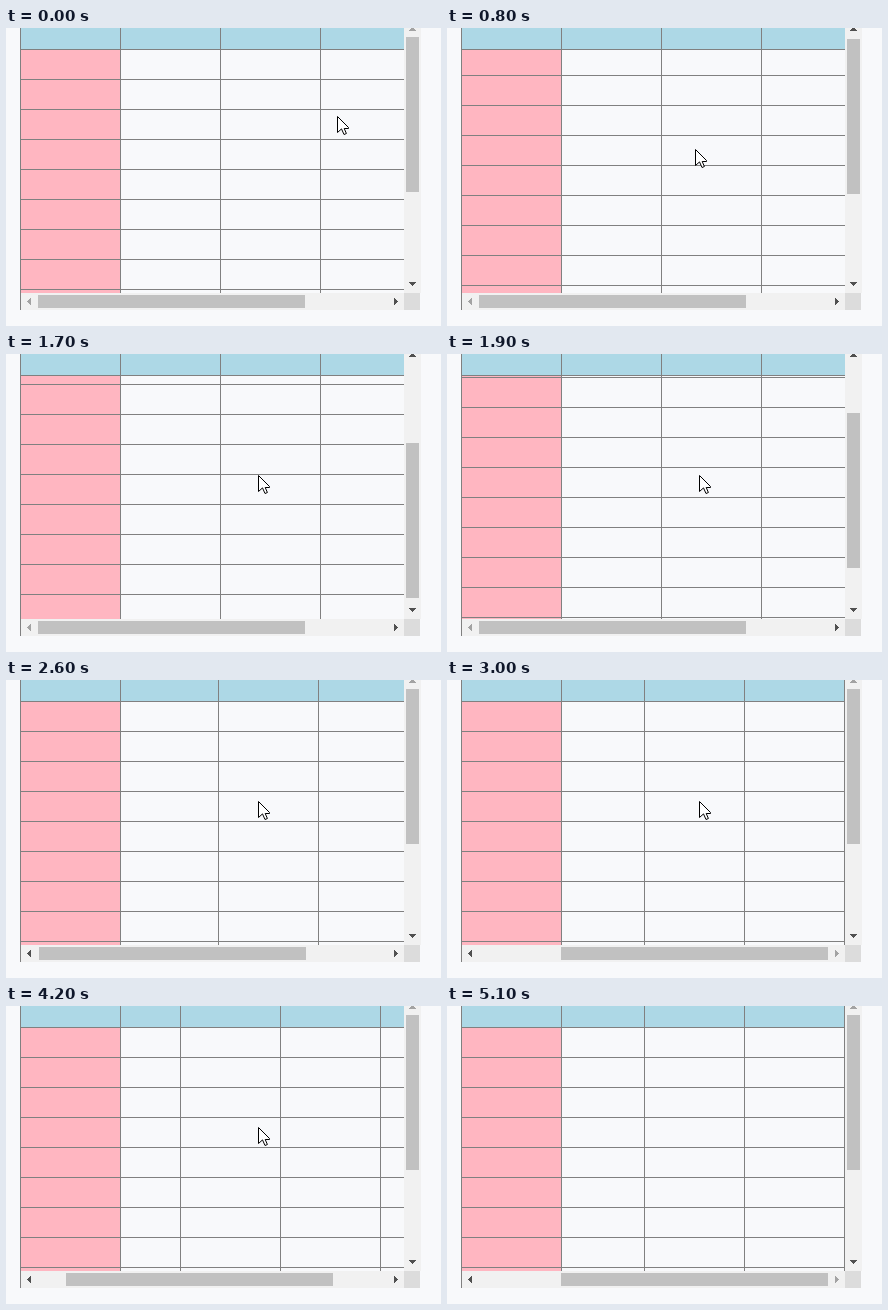
Recreate the animation shown at these times as an HTML page with a canvas. Size 435x298 px, loop 5500 ms.

```html
<!DOCTYPE html>
<html lang="en">
<head>
<meta charset="utf-8">
<title>Table with sticky header and column</title>
<style>
  html, body { margin: 0; width: 100%; height: 100%; overflow: hidden; background: #f8f9fb; }
  canvas { display: block; }
</style>
</head>
<body>
<canvas id="stage" width="435" height="298"></canvas>
<script>
const ctx = document.getElementById('stage').getContext('2d');
const LOOP = 5500, STEP = 100, MAX_X = 117, MAX_Y = 148;
const LINE = '#808080', TRACK = '#f1f1f1', THUMB = '#c1c1c1';

// Scroll gestures: each one accelerates from the previous position to `to`.
const verticalMoves = [
  { start: 700, end: 1000, to: 57 },
  { start: 1300, end: 1700, to: 141 },
  { start: 1700, end: 2000, to: 0 },
];
const horizontalMoves = [
  { start: 2500, end: 3000, to: MAX_X },
  { start: 3200, end: 3400, to: 76 },
  { start: 3700, end: 4000, to: 0 },
  { start: 4000, end: 4200, to: 40 },
  { start: 4400, end: 4600, to: MAX_X },
];
const pointerStops = [
  { at: 0, x: 331, y: 88 },
  { at: 100, x: 248, y: 121 },
  { at: 1400, x: 252, y: 121 },
  { at: 5000, x: 312, y: 96 },
];
const POINTER_GONE = 5100;

const arrowCursor = new Path2D(
  'M.5 .5V16.5L4.5 12.9L7 18.5L9.4 17.5L7.2 12.5H11.5V11.5Z');

const accelerate = p => p ** 2.4;

function scrollAt(moves, time) {
  let position = 0;
  for (const { start, end, to } of moves) {
    const progress = Math.min(1, Math.max(0, (time - start) / (end - start)));
    position += (to - position) * accelerate(progress);
  }
  return Math.round(position);
}

function rect(x, y, w, h, color) {
  ctx.fillStyle = color;
  ctx.fillRect(x, y, w, h);
}

// Arrowhead of four one-pixel rows, widening from its tip along (dx, dy).
function arrowhead(x, y, dx, dy, enabled) {
  const color = enabled ? '#505050' : '#a3a3a3';
  for (let i = 0; i < 4; i++) {
    const size = 2 * i + 1;
    if (dx) rect(x + dx * i, y - i, 1, size, color);
    else rect(x - i, y + dy * i, size, 1, color);
  }
}

function drawTable(sx, sy) {
  ctx.save();
  ctx.beginPath();
  ctx.rect(14, 0, 384, 265);
  ctx.clip();
  rect(15, 0, 99, 265, '#ffb6c1');
  for (let y = 21 - sy; y < 265; y += 30) rect(14, y, 384, 1, LINE);
  rect(14, 0, 384, 21, '#add8e6');
  rect(14, 21, 384, 1, LINE);
  for (let x = 214 - sx; x < 398; x += 100) if (x > 114) rect(x, 0, 1, 265, LINE);
  rect(114, 0, 1, 265, LINE);
  ctx.restore();
  rect(14, 0, 1, 282, LINE);
}

function drawScrollbars(sx, sy) {
  rect(398, 0, 17, 265, TRACK);
  rect(15, 265, 383, 17, TRACK);
  rect(398, 265, 16, 17, '#dcdcdc');
  rect(400, 9 + Math.round(sy * 84 / MAX_Y), 13, 155, THUMB);
  rect(32 + Math.round(sx * 82 / MAX_X), 267, 267, 13, THUMB);
  arrowhead(406, -1, 0, 1, sy > 0);
  arrowhead(406, 257, 0, -1, sy < MAX_Y);
  arrowhead(21, 273, 1, 0, sx > 0);
  arrowhead(391, 273, -1, 0, sx < MAX_X);
}

function drawPointer(time) {
  if (time >= POINTER_GONE) return;
  const { x, y } = pointerStops.findLast(stop => stop.at <= time);
  ctx.save();
  ctx.translate(x, y);
  ctx.fillStyle = '#fff';
  ctx.strokeStyle = '#000';
  ctx.fill(arrowCursor);
  ctx.stroke(arrowCursor);
  ctx.restore();
}

function draw(time) {
  const sx = scrollAt(horizontalMoves, time), sy = scrollAt(verticalMoves, time);
  rect(0, 0, 435, 298, '#f8f9fb');
  drawTable(sx, sy);
  drawScrollbars(sx, sy);
  drawPointer(time);
}

const begin = performance.now();
function tick() {
  const time = (performance.now() - begin) % LOOP;
  draw(Math.floor(time / STEP) * STEP);
  requestAnimationFrame(tick);
}
tick();
</script>
</body>
</html>
```
